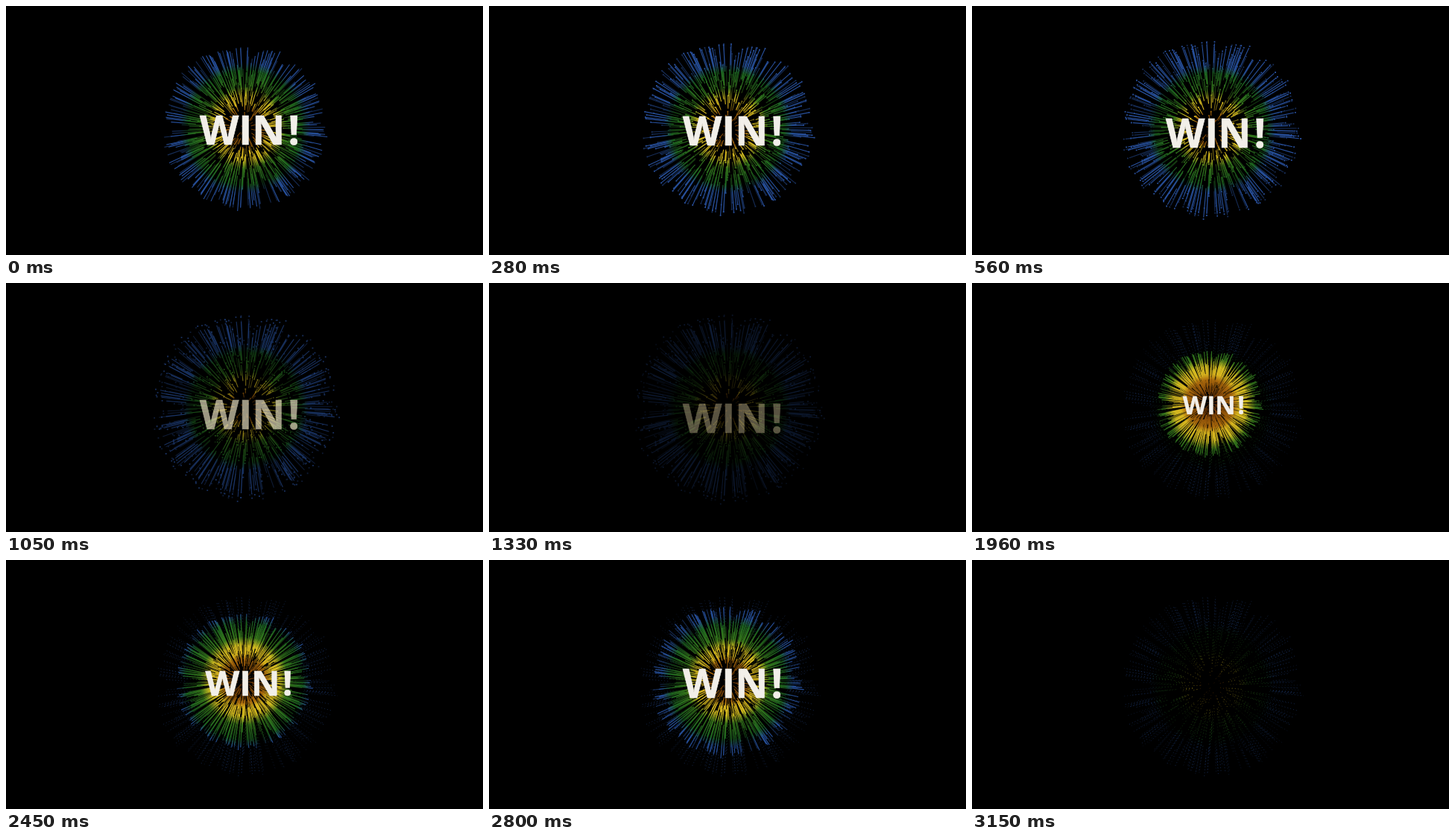
An HTML page with a canvas for the animation above (3290 ms loop, 640 by 334 pixels).

```html
<!DOCTYPE html>
<html lang="en">
<head>
<meta charset="utf-8">
<title>Win</title>
<style>
  html, body { margin: 0; width: 100%; height: 100%; overflow: hidden; background: #000; }
  canvas, svg { position: absolute; left: 0; top: 0; width: 640px; height: 334px; display: block; }
  text { font-family: "Open Sans", "Noto Sans", sans-serif; font-weight: 700; stroke-width: 0.012em; }
</style>
</head>
<body>
<canvas id="sky" width="640" height="334"></canvas>
<svg viewBox="0 0 640 334"><text id="word">WIN<tspan dx="0.075em">!</tspan></text></svg>
<script>
const LOOP = 3290, STEP = 70, BURST = 1610, BLINK = 3150, LIFE = 3080;
const ctx = document.getElementById('sky').getContext('2d');
const word = document.getElementById('word');

let seed = 20417;
function rnd() {
  seed = (seed * 1664525 + 1013904223) % 4294967296;
  return seed / 4294967296;
}
const clamp = (v, lo, hi) => Math.max(lo, Math.min(hi, v));

// Sparks on a sphere seen from the front; a third of them lag on inner shells.
const sparks = Array.from({ length: 600 }, (_, i) => {
  const z = rnd() * 2 - 1;
  const angle = i * 2.399963 + rnd() * 0.08;
  const speed = rnd() < 0.35 ? 0.4 + 0.5 * rnd() : 0.94 + 0.07 * rnd();
  return {
    x: Math.cos(angle), y: Math.sin(angle),
    reach: Math.sqrt(1 - z * z) * speed,
    tail: rnd() * 0.2,
    dim: rnd() < 0.45
  };
});

const radius = u => 139 - 86 * Math.exp(-0.00075 * u);
const centre = u => [318.5 + 0.0012 * u, 161.5 + 0.75e-6 * u * u];

function palette(u, cx, cy) {
  const age = u / LIFE;
  const core = 42 - 20 * age, yellow = 58 - 17 * age, blue = 86 - 9 * age;
  const paint = ctx.createRadialGradient(cx, cy, 0, cx, cy, 140);
  const stops = [
    [0, '#4a2000'], [core * 0.4, '#7c4206'], [core * 0.8, '#a8680c'], [core, '#d8b41e'],
    [yellow - 6, '#d0ba20'], [yellow + 6, '#35741a'], [blue - 5, '#1c6420'],
    [blue + 6, '#244c94'], [140, '#2c54a8']
  ];
  for (const [r, color] of stops) paint.addColorStop(r / 140, color);
  return paint;
}

function drawTrails(u, alpha, dim, dots) {
  const [cx, cy] = centre(u);
  const R = radius(u);
  const base = Math.min(0.58, 0.3 + 0.00015 * u);
  const gap = clamp((u - 1800) / 800, 0, 1) * 0.05;
  ctx.globalAlpha = alpha * (dim ? 0.55 : 1);
  ctx.strokeStyle = palette(u, cx, cy);
  ctx.lineWidth = dots ? 1 : 1.1;
  ctx.setLineDash(dots ? [1, 3] : []);
  ctx.beginPath();
  for (const s of sparks) {
    if (s.dim !== dim) continue;
    const head = R * s.reach, from = head * (base + s.tail), to = head * (1 - gap);
    ctx.moveTo(cx + s.x * from, cy + s.y * from);
    ctx.lineTo(cx + s.x * to, cy + s.y * to);
    if (gap && !dots) ctx.rect(cx + s.x * head - 0.35, cy + s.y * head - 0.35, 0.7, 0.7);
  }
  ctx.stroke();
}

function drawBurst(u, alpha, dots) {
  drawTrails(u, alpha, true, dots);
  drawTrails(u, alpha, false, dots);
}

function drawGlow() {
  ctx.globalAlpha = 1;
  ctx.fillStyle = '#182a10';
  ctx.beginPath();
  ctx.ellipse(375, 160, 7, 9, 0.2, 0, Math.PI * 2);
  ctx.fill();
}

function drawWord(u) {
  const width = u < 1120 ? Math.min(130, 54 + 0.08 * u - 1.08e-5 * u * u) : 130;
  const size = width / 2.4;
  const fall = Math.max(0, u - 1100) / 1000;
  const light = clamp(1 - (u - 2240) / 1000, 0, 1);
  const fade = 1 - light;
  const x = 322 + 3 * (width - 54) / 76 - width / 2;
  const y = 164 + 1.2 * Math.min(1, u / 1100) + 5.2 * fall * fall + size * 0.357;
  const color = `rgb(242,${Math.round(239 - 20 * fade)},${Math.round(233 - 90 * fade)})`;
  word.setAttribute('x', x.toFixed(2));
  word.setAttribute('y', y.toFixed(2));
  word.setAttribute('font-size', size.toFixed(2));
  word.setAttribute('fill', color);
  word.setAttribute('stroke', color);
  word.setAttribute('opacity', light.toFixed(3));
}

function render(time) {
  const t = Math.floor((time % LOOP) / STEP) * STEP;
  const blink = t >= BLINK;
  const u = t < BURST ? t + LIFE / 2 : t - BURST;
  ctx.globalAlpha = 1;
  ctx.fillStyle = '#000';
  ctx.fillRect(0, 0, 640, 334);
  word.style.display = blink ? 'none' : '';
  if (t >= BURST) drawBurst(LIFE, 0.45, true);
  if (blink) return;
  if (u < 350) drawGlow();
  drawBurst(u, clamp(1 - (u - 2240) / 840, 0.2, 1), false);
  drawWord(u);
}

let start;
function tick(now) {
  if (start === undefined) start = now;
  render(now - start);
  requestAnimationFrame(tick);
}
render(0);
requestAnimationFrame(tick);
</script>
</body>
</html>
```
